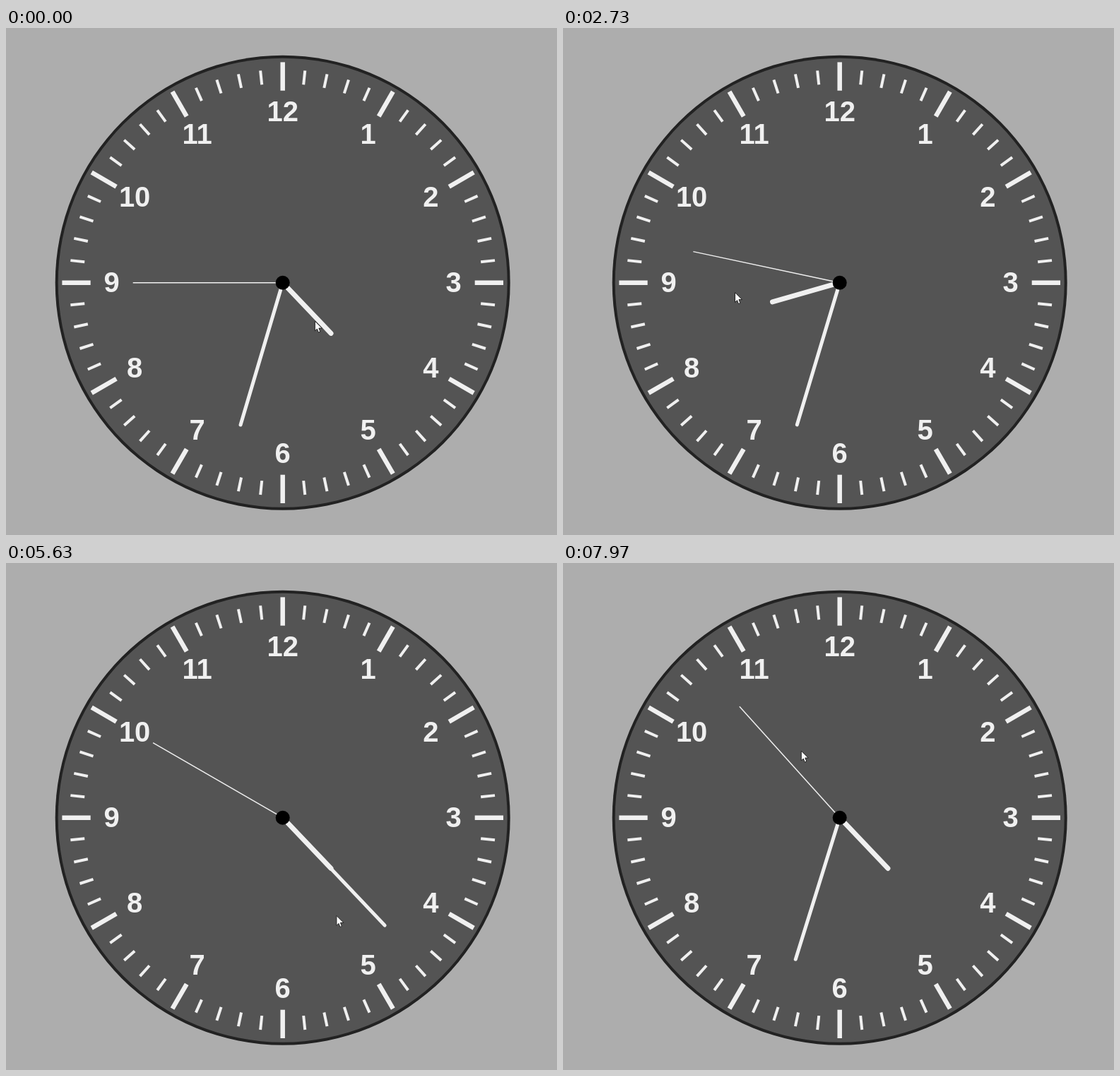
Animation, 780 px wide and 718 px high, one loop 8 s. Source, as an HTML page with a canvas:

```html
<!DOCTYPE html>
<html>
<head>
<meta charset="utf-8">
<style>
  html, body { margin: 0; width: 100%; height: 100%; overflow: hidden; background: #adadad; }
  canvas { display: block; }
</style>
</head>
<body>
<canvas id="stage" width="780" height="718"></canvas>
<script>
const ctx = document.getElementById('stage').getContext('2d');
const LOOP = 8000, CX = 391.7, CY = 360.7;
const LIGHT = '#f0f0f0';

// Turning points of the pointer around the hub: [time, clockwise angle from 12, distance]
const stops = [
  [0, 140, 71], [180, 135, 303], [370, 136.4, 80],
  // swing the hour hand back, forth, then all the way round
  [930, 136.4, 80], [1380, -92, 107], [1730, 20, 104], [2030, 20, 104],
  [2170, 69, 128], [2350, 125, 200], [2900, 291, 134],
  // move over to the minute hand
  [3230, 291, 134], [3630, 220, 107], [4300, 193, 205],
  // swing the minute hand round and back
  [4900, 196.9, 160], [5035, 272.4, 260], [5070, 278.5, 256], [5950, 586, 130],
  [6300, 573.7, 137], [6530, 455, 150], [7050, 299.3, 128], [7500, 341, 130],
  [LOOP, 330, 109]
];
const LAG = 35;
const hourDrag = [930, 2900], minuteDrag = [4900, 7520];

function slope(i, k) {
  return (stops[i + 1][k] - stops[i][k]) / (stops[i + 1][0] - stops[i][0]);
}

function tangent(i, k) {
  if (i === 0 || i === stops.length - 1) return 0;
  const a = slope(i - 1, k), b = slope(i, k);
  return a * b <= 0 ? 0 : 2 * a * b / (a + b);
}

// Monotone cubic interpolation of column k
function sample(t, k) {
  const time = Math.max(0, t);
  const i = stops.findIndex(stop => stop[0] > time) - 1;
  const p = stops[i], q = stops[i + 1], h = q[0] - p[0];
  const u = (time - p[0]) / h, v = 1 - u;
  return v * v * (1 + 2 * u) * p[k] + u * u * (3 - 2 * u) * q[k]
    + h * u * v * (v * tangent(i, k) - u * tangent(i + 1, k));
}

function polar(angle, r) {
  const a = angle * Math.PI / 180;
  return [CX + r * Math.sin(a), CY - r * Math.cos(a)];
}

function disc(r, color) {
  ctx.fillStyle = color;
  ctx.beginPath();
  ctx.arc(CX, CY, r, 0, 2 * Math.PI);
  ctx.fill();
}

function spoke(angle, from, to, width, cap) {
  ctx.strokeStyle = LIGHT;
  ctx.lineWidth = width;
  ctx.lineCap = cap;
  ctx.beginPath();
  ctx.moveTo(...polar(angle, from));
  ctx.lineTo(...polar(angle, to));
  ctx.stroke();
}

function drawDial() {
  ctx.fillStyle = '#adadad';
  ctx.fillRect(0, 0, 780, 718);
  disc(322, '#222');
  disc(318, '#545454');
  for (let i = 0; i < 60; i++) {
    if (i % 5) spoke(i * 6, 282, 302, 4, 'butt');
    else spoke(i * 6, 272, 312.3, 6.5, 'butt');
  }
  ctx.fillStyle = LIGHT;
  ctx.font = 'bold 40px "Liberation Sans", Arial, sans-serif';
  ctx.textAlign = 'center';
  for (let n = 1; n <= 12; n++) {
    const [x, y] = polar(n * 30, 242);
    ctx.fillText(n, x, y + 13);
  }
}

function drawPointer(x, y) {
  ctx.beginPath();
  [[0, 0], [0, 14], [3, 11], [5, 16], [7.5, 15], [5.5, 10], [10, 10]]
    .forEach(([dx, dy]) => ctx.lineTo(x + dx, y + dy));
  ctx.closePath();
  ctx.fillStyle = '#fff';
  ctx.strokeStyle = '#222';
  ctx.lineWidth = 1;
  ctx.fill();
  ctx.stroke();
}

function render(t) {
  const seconds = 45 + Math.floor((t + 240) / 1000);
  const minutes = 32 + seconds / 60;
  const held = ([from, to]) => t >= from && t < to;
  const dragged = sample(t - LAG, 1);

  drawDial();
  spoke(held(hourDrag) ? dragged : 120 + minutes / 2, 0, 99, 7, 'round');
  spoke(held(minuteDrag) ? dragged : minutes * 6, 0, 210, 5, 'round');
  spoke(seconds * 6, 0, 212, 1.5, 'butt');
  disc(10, '#000');
  drawPointer(...polar(sample(t, 1), sample(t, 2)));
}

const start = performance.now();
function tick() {
  render((performance.now() - start) % LOOP);
  requestAnimationFrame(tick);
}
tick();
</script>
</body>
</html>
```
